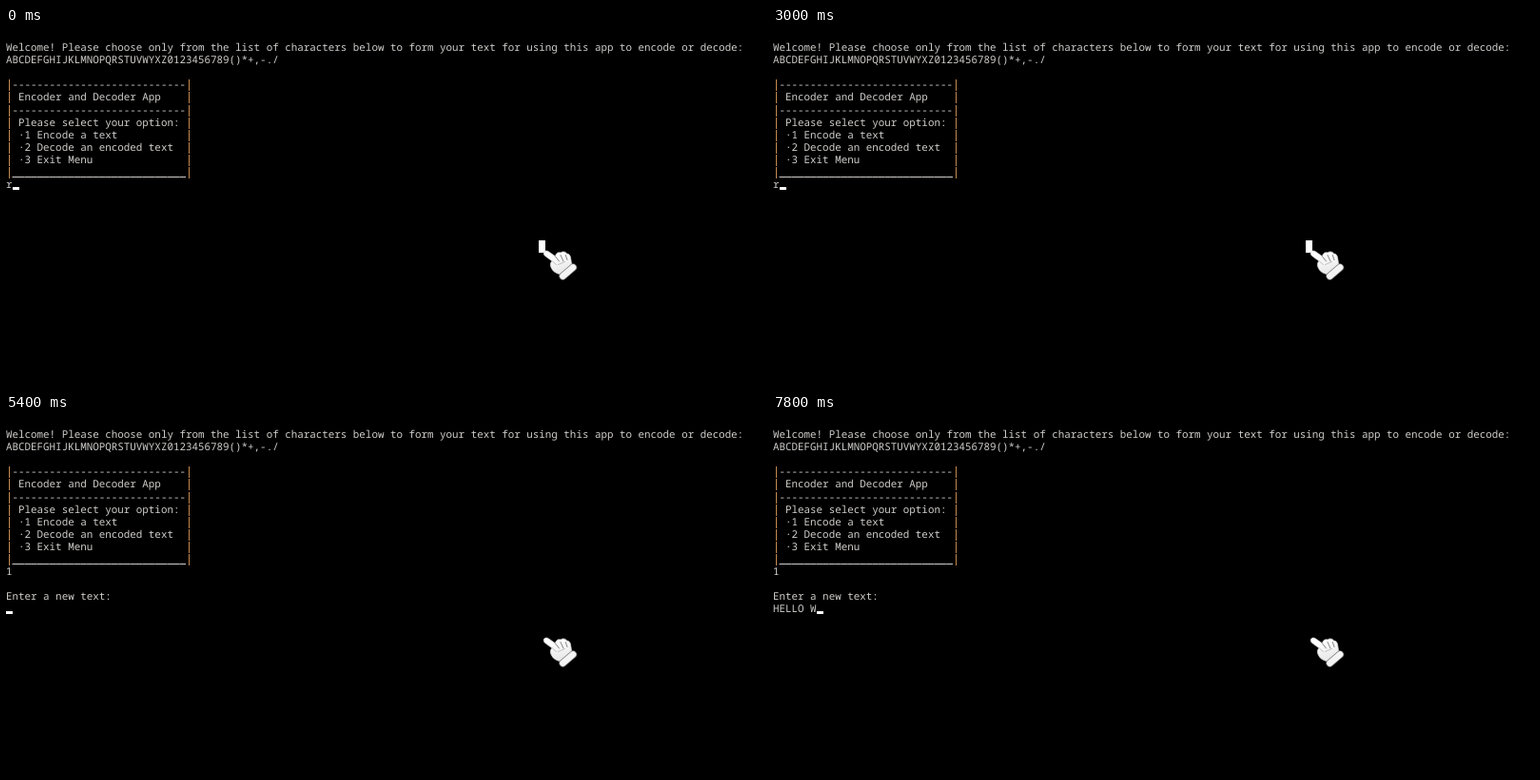
Recreate the animation shown at these times as an HTML page with a canvas. Size 800 px wide and 377 px high, loop 8000 ms.

```html
<!DOCTYPE html>
<html lang="en">
<head>
<meta charset="utf-8">
<title>Encoder console</title>
<style>
  html, body { margin: 0; width: 100%; height: 100%; overflow: hidden; background: #000; }
  canvas { display: block; }
</style>
</head>
<body>
<canvas id="stage" width="800" height="377"></canvas>
<script>
const ctx = document.getElementById('stage').getContext('2d');
const LOOP = 8000;
const CELL = 6.515, PITCH = 13.1, FIRST_BASE = 24;
const TEXT = '#d0cecb', BAR = '#c4894f';
const BLINK = 1060;

// Times of the user's actions, in ms
const RESUME = 3800, CHOOSE = 4500, ENTER = 5200;
const TYPED = 'HELLO W';
const KEY_TIMES = [6900, 7100, 7300, 7420, 7540, 7660, 7780];

const rule = '|' + '-'.repeat(28) + '|';
const boxed = s => '| ' + s.padEnd(27) + '|';
const SCREEN = [
  'Welcome! Please choose only from the list of characters below to form your text for using this app to encode or decode:',
  'ABCDEFGHIJKLMNOPQRSTUVWYXZ0123456789()*+,-./',
  '',
  rule,
  boxed('Encoder and Decoder App'),
  rule,
  boxed('Please select your option:'),
  boxed('·1 Encode a text'),
  boxed('·2 Decode an encoded text'),
  boxed('·3 Exit Menu'),
  '|' + '_'.repeat(28) + '|'
];

const baseline = row => Math.round(FIRST_BASE + row * PITCH);

function drawChar(ch, col, row) {
  const x = col * CELL, y = baseline(row);
  if (ch === '|') {
    ctx.fillStyle = BAR;
    ctx.fillRect(Math.round(x + 2.6), y - 9, 1, 12);
  } else if (ch === '_') {
    ctx.fillStyle = TEXT;
    ctx.fillRect(x, y + 1, CELL + 0.1, 1);
  } else if (ch !== ' ') {
    ctx.fillStyle = TEXT;
    ctx.fillText(ch, x, y);
  }
}

function drawLine(text, row) {
  [...text].forEach((ch, col) => drawChar(ch, col, row));
}

function drawCursor(col, row) {
  ctx.fillStyle = '#fff';
  ctx.fillRect(Math.round(col * CELL), baseline(row) - 1, 7, 3);
}

function drawHand() {
  ctx.save();
  ctx.lineJoin = ctx.lineCap = 'round';

  const hand = new Path2D(
    'M565.5 235.5 C566.5 233.5 569 233.6 571 235.2 L577.5 239.8 ' +
    'C578 236.5 580.5 235 583 236 C585.5 234 588.5 235 589.5 237 ' +
    'C592 237 593.5 239 593.7 242 L594.8 249 L584.5 259 ' +
    'C580 258.5 575.5 256.5 573.5 252.5 C571.8 249.5 572 246.5 574 244.8 ' +
    'L567.5 240 C565.5 238.7 564.7 237 565.5 235.5 Z');
  const shade = ctx.createLinearGradient(580, 236, 586, 262);
  shade.addColorStop(0, '#ffffff');
  shade.addColorStop(1, '#e2e2e2');
  ctx.fillStyle = shade;
  ctx.fill(hand);
  ctx.strokeStyle = '#d4d4d4';
  ctx.lineWidth = 0.7;
  ctx.stroke(hand);

  // Folded fingers
  ctx.strokeStyle = '#777';
  ctx.lineWidth = 0.9;
  ctx.stroke(new Path2D('M577.5 240 L581.5 245 M583 238.5 L586 245 M588.3 238.5 L590 243.5'));
  ctx.strokeStyle = '#bbb';
  ctx.stroke(new Path2D('M574.5 245 L578.5 248.5 M580.5 248.5 L587.5 245.5'));

  // Cuff
  const cuff = new Path2D('M585.5 260.5 L596 251.5');
  ctx.strokeStyle = '#777';
  ctx.lineWidth = 8.2;
  ctx.stroke(cuff);
  ctx.strokeStyle = '#f4f4f4';
  ctx.lineWidth = 6.6;
  ctx.stroke(cuff);
  ctx.restore();
}

function draw(t) {
  ctx.fillStyle = '#000';
  ctx.fillRect(0, 0, 800, 377);
  ctx.font = '10.86px "Noto Sans Mono", "DejaVu Sans Mono", monospace';
  ctx.textRendering = 'geometricPrecision';
  ctx.textBaseline = 'alphabetic';
  SCREEN.forEach(drawLine);

  const blinkOn = (t + 120) % BLINK < BLINK / 2;
  const selecting = t < RESUME;
  let col = 0, row = 11;

  if (selecting) {
    drawLine('r', row);
    col = 1;
    ctx.fillStyle = '#fff';
    ctx.fillRect(560, 223, 7, 13);
  } else if (t >= CHOOSE) {
    drawLine('1', row);
    col = 1;
  }
  if (t >= ENTER) {
    drawLine('Enter a new text:', 13);
    row = 14;
    col = KEY_TIMES.filter(k => k <= t).length;
    drawLine(TYPED.slice(0, col), row);
  }
  // The console holds its cursor still while a cell is selected
  if (selecting || blinkOn) drawCursor(col, row);
  drawHand();
}

const start = performance.now();
function frame() {
  draw((performance.now() - start) % LOOP);
  requestAnimationFrame(frame);
}
frame();
</script>
</body>
</html>
```
